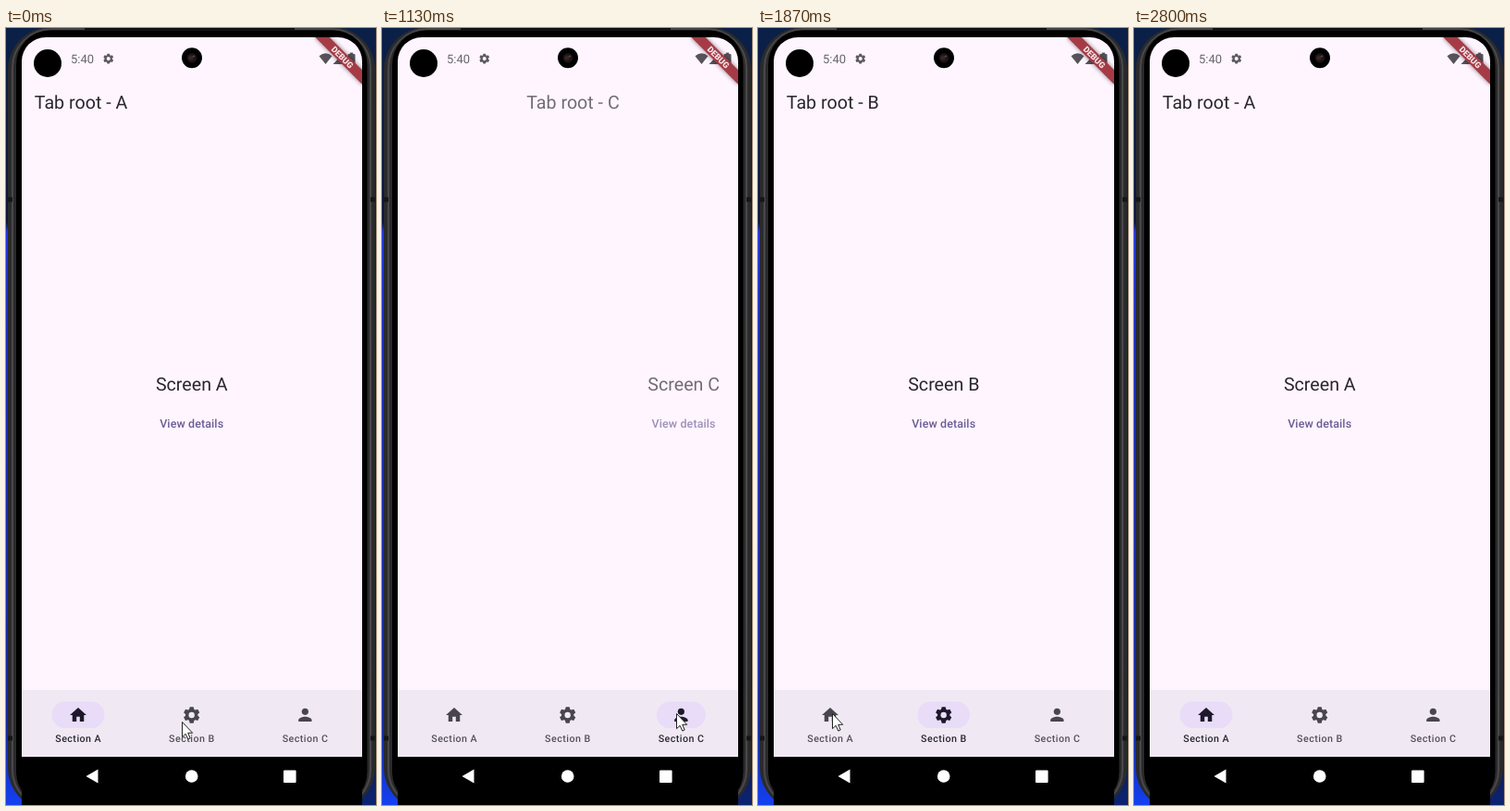
Recreate the animation shown at these times as an HTML page. Size 400 by 838 pixels, loop 3.14 s.

```html
<!DOCTYPE html>
<html lang="en">
<head>
<meta charset="utf-8">
<title>Tab navigation</title>
<style>
  html, body { margin: 0; width: 100%; height: 100%; overflow: hidden; background: #0b1a3c; }
  svg { display: block; width: 100%; height: 100%; }
  text { font-family: Roboto, "Noto Sans", sans-serif; text-rendering: geometricPrecision; }
  .big { font-size: 19.65px; fill: #29262d; }
  .link { font-size: 12.5px; font-weight: 500; letter-spacing: .09px; fill: #6b5c94; }
  .label { font-size: 10.7px; font-weight: 500; letter-spacing: .45px; }
  .mid { text-anchor: middle; }
</style>
</head>
<body>
<svg viewBox="0 0 400 838" preserveAspectRatio="none">
  <defs>
    <linearGradient id="desk" x2="0" y2="1">
      <stop offset="0" stop-color="#0b2048"/>
      <stop offset=".25" stop-color="#0b1838"/>
      <stop offset=".262" stop-color="#2334e8"/>
      <stop offset=".39" stop-color="#1c2cc8"/>
      <stop offset=".64" stop-color="#1a2ab8"/>
      <stop offset=".9" stop-color="#1428a8"/>
      <stop offset="1" stop-color="#1440f0"/>
    </linearGradient>
    <linearGradient id="deskRight" x2="0" y2="1">
      <stop offset="0" stop-color="#0b2048"/>
      <stop offset=".85" stop-color="#0b1838"/>
      <stop offset="1" stop-color="#0b2270"/>
    </linearGradient>
    <filter id="soft" x="-30%" y="-80%" width="160%" height="260%"><feGaussianBlur stdDeviation="2.4"/></filter>
    <clipPath id="screen"><path d="M17 838V36a26 26 0 0 1 26-26H359a26 26 0 0 1 26 26V838z"/></clipPath>
    <g id="home"><path d="M10 20v-6h4v6h5v-8h3L12 3 2 12h3v8z"/></g>
    <g id="gear"></g>
    <g id="person"><circle cx="12" cy="8" r="4"/><path d="M12 14c-2.67 0-8 1.34-8 4v2h16v-2c0-2.66-5.33-4-8-4z"/></g>
  </defs>

  <rect width="200" height="838" fill="url(#desk)"/>
  <rect x="200" width="200" height="838" fill="url(#deskRight)"/>

  <!-- phone body -->
  <rect x="2" y="-1" width="397" height="845" rx="46" fill="#2a2a2c"/>
  <rect x="7" y="1.5" width="387" height="840" rx="42" fill="none" stroke="#48484b" stroke-width="2.4"/>
  <rect x="8.2" y="2" width="384.6" height="838.5" rx="40" fill="#2a2a2c"/>
  <rect x="11" y="2.5" width="379.5" height="837" rx="37" fill="#000"/>
  <path d="M85 1H312" stroke="#111113" stroke-width="2.5"/>
  <path d="M2 185h5M394 185h5M2 766h5M394 766h5" stroke="#161618" stroke-width="5"/>

  <g clip-path="url(#screen)">
    <rect x="17" y="10" width="368" height="776" fill="#fef5ff"/>
    <g id="pages"></g>
    <rect x="17" y="714" width="368" height="72" fill="#f0e9f4"/>
    <g id="tabs"></g>
    <rect x="17" y="786" width="368" height="52" fill="#000"/>

    <!-- status bar -->
    <text x="70" y="37.8" font-size="13" fill="#69656c">5:40</text>
    <use href="#gear" transform="translate(104 26.4) scale(.56)" fill="#5d5960" color="#5d5960"/>
    <g fill="#57535a">
      <path d="M338.5 30.2Q345.5 24.5 352.5 30.2L345.5 39z"/>
      <path d="M353.5 39L364 28V39z"/>
      <rect x="369.5" y="28" width="8" height="12" rx="1"/>
      <rect x="371.8" y="26.6" width="3.4" height="2"/>
    </g>
    <g transform="translate(385 10) rotate(45)">
      <rect x="-36" y="25" width="72" height="10.8" fill="#000" opacity=".5" filter="url(#soft)"/>
      <rect x="-36" y="25" width="72" height="10.8" fill="#a63b46"/>
      <text class="mid" y="33.6" font-size="9.1" font-weight="900" fill="#f4e6e8">DEBUG</text>
    </g>
  </g>

  <circle cx="45" cy="38" r="15"/>
  <circle cx="201" cy="32.3" r="11"/>
  <circle cx="201" cy="32.3" r="5.2" fill="#1c1416"/>
  <circle cx="200" cy="32" r="2.6" fill="#3a2426"/>
  <circle cx="203" cy="30.6" r="1" fill="#5d4c4e"/>

  <g fill="#fff">
    <path d="M86.5 807L99.5 799.5V814.5z"/>
    <circle cx="200.7" cy="807" r="6.8"/>
    <rect x="300" y="800.4" width="13.6" height="13.6" rx="1"/>
  </g>

  <path id="cursor" d="M0 0V16.2L3.7 12.8L6.3 18.6L8.7 17.5L6.2 11.8H11.2z" fill="#fff" stroke="#222" stroke-width="1" stroke-linejoin="round"/>
</svg>

<script>
const LOOP = 3140, WIDTH = 368, SLIDE = 300, GROW = 500, FADE = 100;
const FRAME = 200 / 3;
const $ = id => document.getElementById(id);
const clamp = v => Math.min(1, Math.max(0, v));

// Tab changes: tap starts the highlight, slide starts the page.
const moves = [
  { from: 0, to: 1, tap: 300, slide: 300 },
  { from: 1, to: 2, tap: 955, slide: 955 },
  { from: 2, to: 1, tap: 1490, slide: 1490 },
  { from: 1, to: 0, tap: 2100, slide: 2166 }
];

// Pointer stops: time, x, y.
const stops = [
  [0, 191, 749], [400, 193, 748], [530, 193, 748], [800, 319, 740], [1200, 319, 740],
  [1400, 208, 740], [1670, 208, 740], [1870, 81, 740], [1930, 81, 740], [2070, 68, 738]
];
const CURSOR_END = 2520;

function bezier(x1, y1, x2, y2) {
  const at = (a, b, u) => 3 * (1 - u) * (1 - u) * u * a + 3 * (1 - u) * u * u * b + u * u * u;
  return x => {
    if (x <= 0 || x >= 1) return clamp(x);
    let lo = 0, hi = 1;
    for (let i = 0; i < 24; i++) {
      const mid = (lo + hi) / 2;
      if (at(x1, x2, mid) < x) lo = mid; else hi = mid;
    }
    return at(y1, y2, lo);
  };
}
const easeInOut = bezier(.42, 0, .58, 1);
const rise = bezier(.3, 0, .8, .15);
const settle = bezier(.05, .7, .1, 1);
const emphasized = x => x < 1 / 6 ? .4 * rise(x * 6) : .4 + .6 * settle((x - 1 / 6) * 1.2);

const teeth = [0, 1, 2, 3, 4, 5].map(i =>
  `<path transform="rotate(${i * 60})" d="M-3.2-6L-2.2-9.8H2.2L3.2-6z"/>`).join("");
$("gear").innerHTML = `<g transform="translate(12 12)">${teeth}
  <circle r="5.5" fill="none" stroke="currentColor" stroke-width="3.8"/></g>`;

const icons = ["home", "gear", "person"];
const letters = ["A", "B", "C"];

$("pages").innerHTML = letters.map(c => `<g>
  <text class="big" x="30.8" y="87.3">Tab root - ${c}</text>
  <text class="big mid" x="200.8" y="391.2">Screen ${c}</text>
  <text class="link mid" x="200.7" y="430.9">View details</text></g>`).join("");

$("tabs").innerHTML = letters.map((c, i) => `<g transform="translate(${78 + i * 122.67} 0)">
  <rect y="726.5" height="28.6" rx="14.3" fill="#e8dcf8"/>
  <use href="#${icons[i]}" transform="translate(-10.7 730.2) scale(.893)"/>
  <text class="label mid" x=".2" y="769.6">Section ${c}</text></g>`).join("");

const pages = [...$("pages").children];
const tabs = [...$("tabs").children].map(g => {
  const [pill, icon, label] = g.children;
  return { pill, icon, label };
});

function drawPages(t) {
  const move = moves.filter(m => t >= m.slide).pop();
  const pos = move
    ? move.from + (move.to - move.from) * easeInOut(clamp((t - move.slide) / SLIDE))
    : 0;
  pages.forEach((page, i) => {
    page.setAttribute("transform", `translate(${(i - pos) * WIDTH} 0)`);
    page.setAttribute("opacity", clamp(1 - Math.abs(i - pos)));
  });
}

function drawTabs(t) {
  const move = moves.filter(m => t >= m.tap).pop() || { from: -1, to: 0, tap: -GROW };
  const age = t - move.tap;
  tabs.forEach(({ pill, icon, label }, i) => {
    const on = i === move.to;
    const width = 57 * (on ? .4 + .6 * emphasized(clamp(age / GROW)) : 1);
    const shown = on ? clamp(age / FADE) : i === move.from ? 1 - clamp(age / FADE) : 0;
    pill.setAttribute("x", -width / 2);
    pill.setAttribute("width", width);
    pill.setAttribute("opacity", shown);
    const ink = on ? "#1d192b" : "#49454f";
    icon.setAttribute("fill", ink);
    icon.setAttribute("color", ink);
    label.setAttribute("fill", on ? "#2a272e" : "#555159");
  });
}

function drawCursor(t) {
  let i = stops.length - 1;
  while (stops[i][0] > t) i--;
  const a = stops[i], b = stops[i + 1] || a;
  const e = easeInOut(clamp((t - a[0]) / (b[0] - a[0] || 1)));
  const x = a[1] + (b[1] - a[1]) * e, y = a[2] + (b[2] - a[2]) * e;
  $("cursor").setAttribute("transform", `translate(${Math.round(x) - .5} ${Math.round(y) - .5})`);
  $("cursor").setAttribute("visibility", t < CURSOR_END ? "visible" : "hidden");
}

// The picture advances at 15 steps a second, on 10 ms marks.
function draw(ms) {
  const mark = Math.floor((ms % LOOP) / 10) * 10;
  const t = Math.floor(mark / FRAME + .06) * FRAME;
  drawPages(t);
  drawTabs(t);
  drawCursor(t);
}

const start = performance.now();
function tick() {
  draw(performance.now() - start);
  requestAnimationFrame(tick);
}
tick();
</script>
</body>
</html>
```
